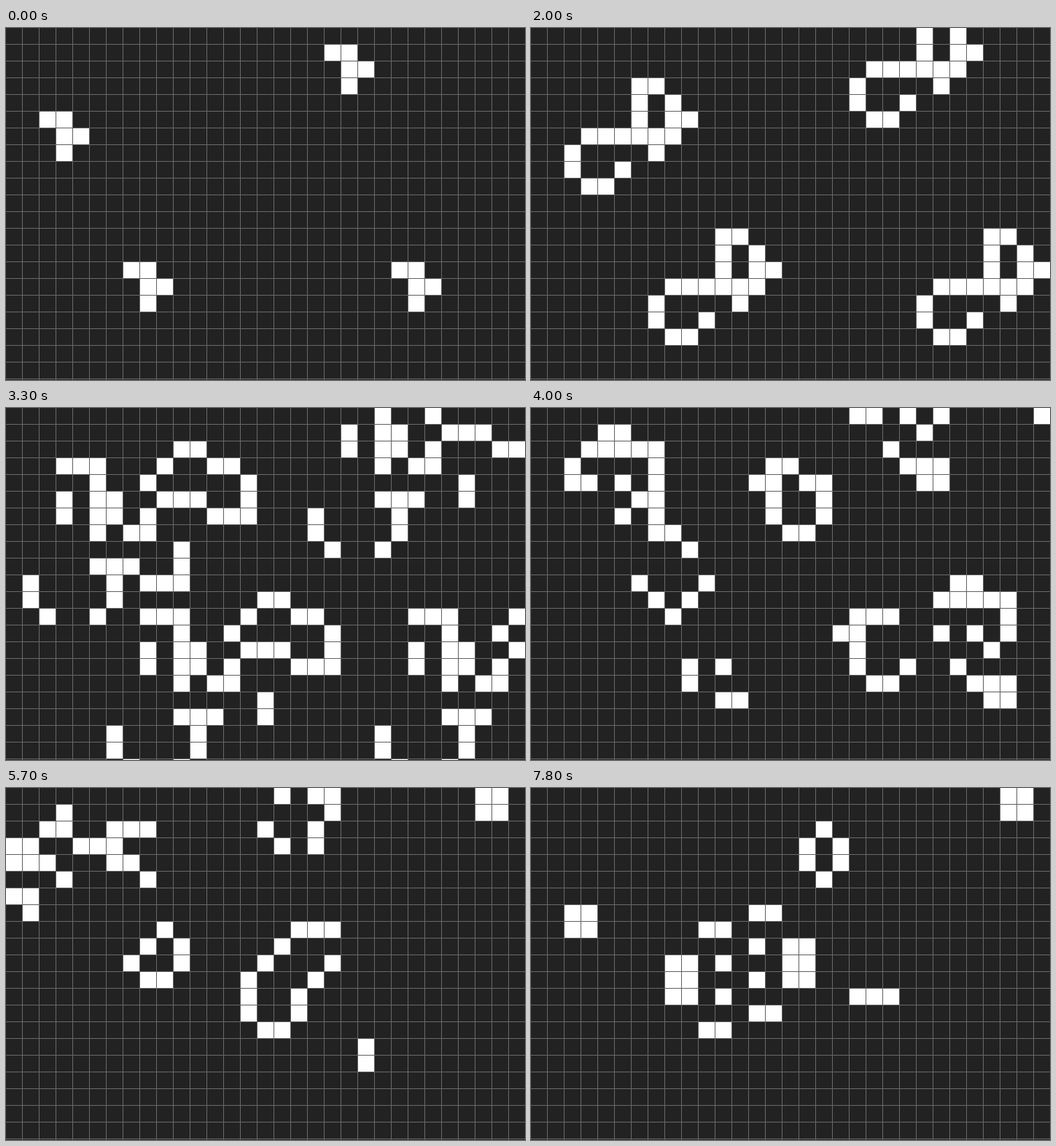
Recreate the animation shown at these times as an HTML page with a canvas. Size 681 by 463 pixels, loop 8 s.

```html
<!DOCTYPE html>
<html>
<head>
<meta charset="utf-8">
<title>Game of Life</title>
<style>
html, body { margin: 0; width: 100%; height: 100%; overflow: hidden; background: #222; }
canvas { display: block; }
</style>
</head>
<body>
<canvas id="board" width="681" height="463"></canvas>
<script>
const LOOP = 8000, TICK = 100, START = 500, GENERATIONS = 65;
const PAUSES = [600, 1500, 2200, 3100, 3800, 4600, 5500, 6400, 7200];
const CELL = 22, W = 681, H = 463;
const ctx = document.getElementById('board').getContext('2d');

// The world is unbounded: a cell is one number, row * SPAN + column, shifted by PAD.
const SPAN = 1000, PAD = 400;
const key = (row, col) => (row + PAD) * SPAN + col + PAD;
const AROUND = [-SPAN - 1, -SPAN, -SPAN + 1, -1, 1, SPAN - 1, SPAN, SPAN + 1];

const PENTOMINO = [[0, 0], [0, 1], [1, 1], [1, 2], [2, 1]];
const SEEDS = [[5, 2], [1, 19], [14, 7], [14, 23]];

function next(live) {
  const counts = new Map();
  for (const cell of live)
    for (const d of AROUND) counts.set(cell + d, (counts.get(cell + d) || 0) + 1);
  const born = new Set();
  for (const [cell, n] of counts)
    if (n === 3 || (n === 2 && live.has(cell))) born.add(cell);
  return born;
}

const history = [new Set(SEEDS.flatMap(([r, c]) => PENTOMINO.map(([y, x]) => key(r + y, c + x))))];
while (history.length <= GENERATIONS) history.push(next(history[history.length - 1]));

function generationAt(t) {
  if (t < START) return 0;
  const ticks = Math.floor((t - START) / TICK) + 1;
  return Math.min(GENERATIONS, ticks - PAUSES.filter(p => p <= t).length);
}

function draw(live) {
  ctx.fillStyle = '#222';
  ctx.fillRect(0, 0, W, H);
  ctx.fillStyle = '#666';
  for (let x = CELL - 1; x < W; x += CELL) ctx.fillRect(x, 0, 1, H);
  for (let y = CELL - 1; y < H; y += CELL) ctx.fillRect(0, y, W, 1);
  ctx.fillStyle = '#fff';
  for (const cell of live) {
    const row = Math.floor(cell / SPAN) - PAD, col = cell % SPAN - PAD;
    ctx.fillRect(col * CELL, row * CELL, CELL - 1, CELL - 1);
  }
}

const begin = performance.now();
function frame() {
  draw(history[generationAt((performance.now() - begin) % LOOP)]);
  requestAnimationFrame(frame);
}
frame();
</script>
</body>
</html>
```
